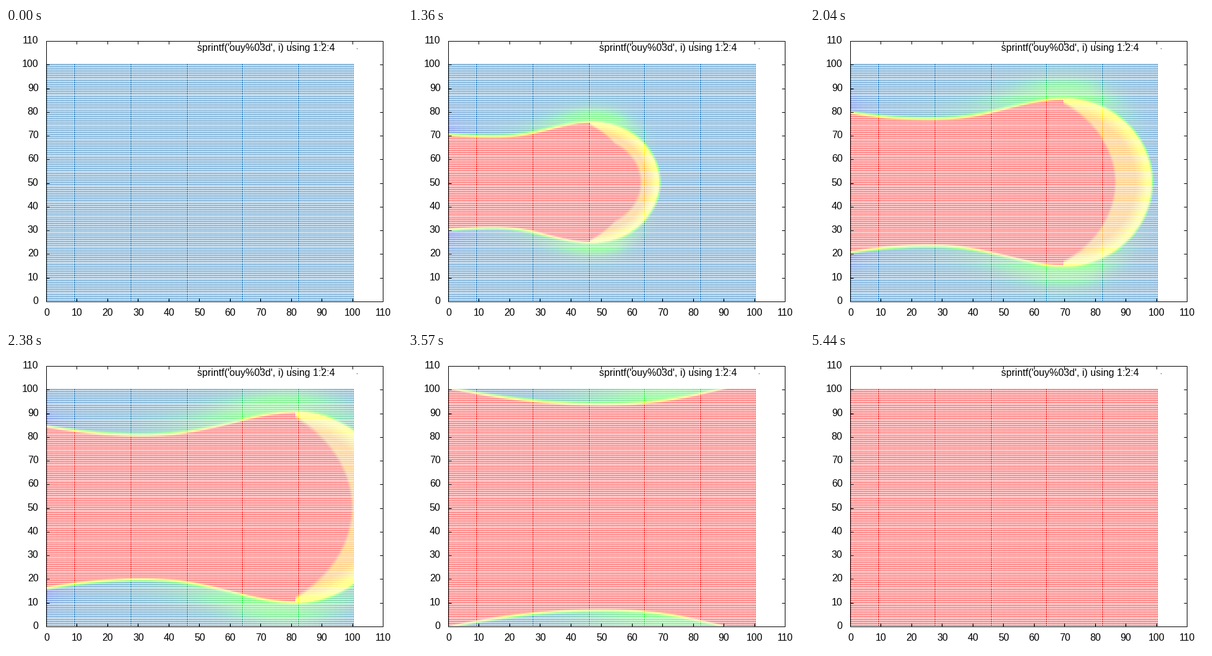
A matplotlib script that plays this animation: 640 by 480 pixels, repeating every 7140 ms.

```python
import numpy as np
import matplotlib.pyplot as plt
from matplotlib.animation import FuncAnimation

W, H, DPI = 640, 480, 100
STEP, FRAMES, LAST = 170, 42, 32
LEFT, RIGHT, TOP, BOTTOM = 65, 609, 20, 441
SX, SY = (RIGHT - LEFT) / 110, (BOTTOM - TOP) / 110
PX = 72 / DPI
MID, BASE = 50.2, .4

# Square cells, one pixel per cell centre.
centres = np.arange(251) * .4 + .2
X, Y = np.meshgrid(centres, centres)
R = np.abs(Y - MID)
COL = np.floor(LEFT + X * SX + .5).astype(int)
ROW = np.floor(BOTTOM - Y * SY + .5).astype(int)


def ramp(v, lo, hi):
    return np.clip((v - lo) / (hi - lo), 0, 1)


def body(x, k):
    """Half-height of the swept zone: inlet, waist, then crest."""
    inlet, waist, crest = 2.35 * k + 1.5, 1.86 * k + 4.7, 2.45 * k + 6.2
    x_waist, x_crest = max(2.7 * k - 7, 1), 5.8 * k
    fall = 1 - (1 - ramp(x, 0, x_waist)) ** 2
    rise = .5 - .5 * np.cos(np.pi * ramp(x, x_waist, x_crest) ** 1.2)
    return inlet + (waist - inlet) * fall + (crest - waist) * rise


def field(k):
    """Value in every cell, from 0 (blue) to 3 (red)."""
    if k == 0:
        return np.full(X.shape, BASE)
    if k == LAST:
        return np.full(X.shape, 3.0)
    if k > 21:  # the flow slows down near the walls
        k = 21 + 4 * (1 - (1 - (k - 21) / 11) ** 2)
    tip, start = 11.1 * k ** .878, 5.8 * k
    h = body(X, k)
    cap = np.maximum(0, X - start) / (tip - start)
    rho = np.hypot(cap, R / h)
    d = (rho - 1) * h
    out = np.maximum(d, 0)

    # ahead of the front: a bank near the crest, a drop near the inlet
    q = X / min(tip, 100)
    bank = .55 * np.exp(-((q - .72) / .3) ** 2) * ramp(k, 3, 7)
    if tip < 110:
        bank = bank * ramp(1 - q, 0, .2)
    drop = ramp(k, 5, 8) * np.exp(-X / 5 - out / 5)
    ahead = BASE * (1 - drop) + bank / (1 + (out / min(.65 * k, 10)) ** 4)
    ahead += (1.4 - ahead) * (1 - ramp(out, 0, .9))

    # behind the front: a mixed crescent inside the rounded cap
    edge = np.maximum(.92 - .6 * cap, max(.55, 1 - .037 * k))
    mix = ramp(rho, edge, edge + .05) * (cap > 0)
    behind = 3 - mix * (.6 + .4 * ramp(rho, .82, .95))
    behind = np.minimum(behind, 1.6 + 1.4 * ramp(-d, 0, 1.1))
    return np.where(d > 0, ahead, behind)


def palette(u):
    red = ramp(u, 1, 2)
    green = np.minimum(ramp(u, 0, 1), 1 - ramp(u, 2, 3))
    blue = 1 - ramp(u, 0, 1) ** 1.3
    return np.stack([red, green, blue], axis=-1)


def draw(i):
    canvas = np.ones((H, W, 3))
    canvas[ROW, COL] = palette(field(min(i, LAST)))
    dots.set_data(canvas)
    return [dots]


fig = plt.figure(figsize=(W / DPI, H / DPI), dpi=DPI, facecolor="white")
dots = fig.figimage(np.ones((H, W, 3)), origin="upper", zorder=-1)

ax = fig.add_axes([LEFT / W, 1 - (BOTTOM + 1) / H,
                   (RIGHT - LEFT) / W, (BOTTOM - TOP) / H], facecolor="none")
ticks = range(0, 111, 10)
ax.set(xlim=(0, 110), ylim=(0, 110), xticks=ticks, yticks=ticks)
ax.tick_params(direction="in", top=True, right=True, length=5 * PX,
               width=PX, labelbottom=False, labelleft=False)
for spine in ax.spines.values():
    spine.set_linewidth(PX)


def label(x, y, text, ha):
    fig.text(x / W, 1 - y / H, text, ha=ha, va="baseline",
             family="Liberation Sans", size=16 * PX)


for v in ticks:
    label(LEFT + .5 + v * SX, 465, str(v), "center")
    label(52.5, BOTTOM + 5 - v * SY, str(v), "right")
label(531.5, 37, "sprintf('ouy%03d', i) using 1:2:4", "right")
fig.add_artist(plt.Rectangle((567 / W, 1 - 34 / H), 1 / W, 1 / H,
                             color="black", lw=0))

anim = FuncAnimation(fig, draw, frames=FRAMES, interval=STEP,
                     repeat=True, repeat_delay=0, blit=False)
plt.show()
```
